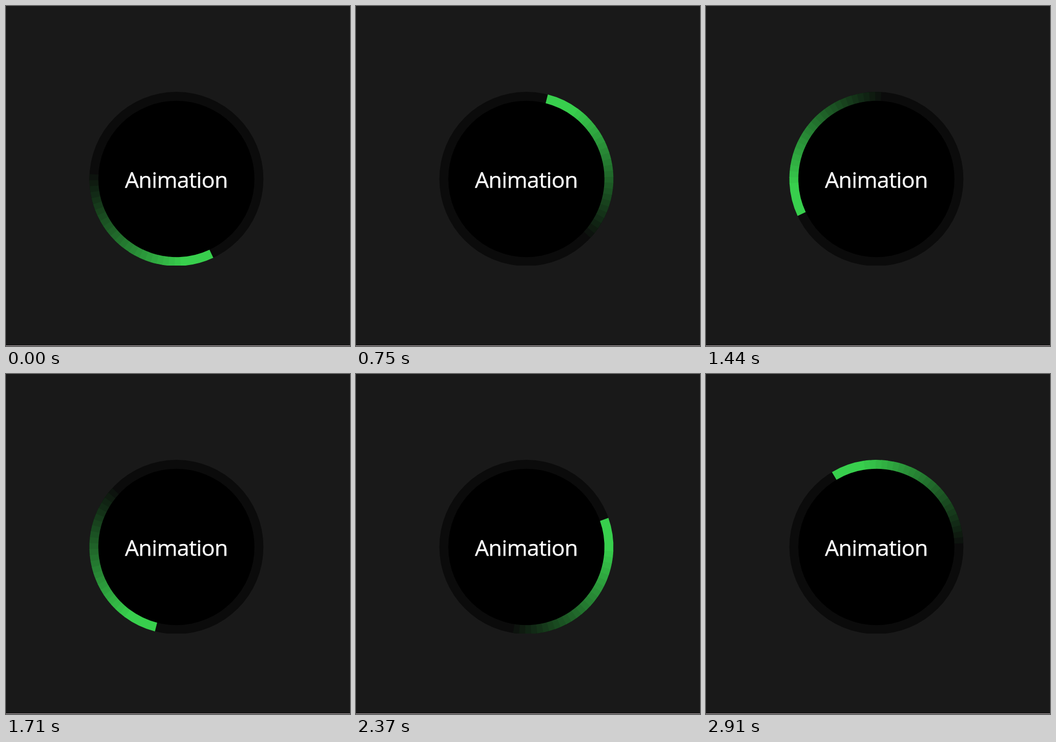
An HTML page with a canvas that plays this animation: 642x634 px, repeating every 3.01 s.

```html
<!DOCTYPE html>
<html lang="en">
<head>
<meta charset="utf-8">
<title>Ring animation</title>
<style>
  html, body { margin: 0; width: 100%; height: 100%; overflow: hidden; background: #191919; }
  canvas { display: block; }
</style>
</head>
<body>
<canvas id="stage" width="642" height="634"></canvas>
<script>
const ctx = document.getElementById('stage').getContext('2d');
const LOOP = 3010, TICK = 30;
const CX = 318, CY = 322.5, OUTER = 162.4, INNER = 145.7;
const GREEN = [56, 207, 77], TRACK = [11, 11, 11];
const START = 64.9, SPEED = 0.1875;            // degrees, degrees per ms
const SOLID = 22, SEGMENT = 4, SEGMENTS = 24;  // bright head, then fading pieces

// The ring turns at constant speed but is redrawn in steps.
// Tempo: number of steps and their average length in ticks.
const TEMPO = [[2, 4.5], [6, 4], [3, 5], [6, 13 / 3], [3, 5], [2, 4]];
const stepTimes = [0];
let clock = 0;
for (const [count, length] of TEMPO) {
  for (let i = 0; i < count; i++) {
    clock += length;
    stepTimes.push(Math.round(clock - 0.1) * TICK);
  }
}

const rad = degrees => degrees * Math.PI / 180;
const mix = amount =>
  `rgb(${TRACK.map((c, i) => Math.round(c + (GREEN[i] - c) * amount)).join(',')})`;

function disc(radius, color) {
  ctx.fillStyle = color;
  ctx.beginPath();
  ctx.arc(CX, CY, radius, 0, 2 * Math.PI);
  ctx.fill();
}

function band(from, to, color) {
  ctx.fillStyle = color;
  ctx.beginPath();
  ctx.arc(CX, CY, OUTER, rad(from), rad(to));
  ctx.arc(CX, CY, INNER, rad(to), rad(from), true);
  ctx.fill();
}

function drawRing(head) {
  ctx.save();
  ctx.beginPath();
  ctx.rect(0, 0, 642, 484);
  ctx.clip();
  disc(OUTER, mix(0));
  disc(INNER, '#000');
  // Tail first; each piece overlaps the one behind so no seams show.
  for (let k = SEGMENTS - 1; k >= 0; k--) {
    const from = head + SOLID + k * SEGMENT;
    band(from, from + SEGMENT + 0.3, mix(1 - (k + 1) / (SEGMENTS + 1)));
  }
  band(head, head + SOLID + 0.3, mix(1));
  ctx.restore();
}

function drawLabel() {
  ctx.fillStyle = ctx.strokeStyle = '#fff';
  ctx.lineWidth = 0.4;
  ctx.font = '41px "Open Sans", "Noto Sans", sans-serif';
  ctx.letterSpacing = '-0.6px';
  ctx.fillText('Animation', 222, 338.5);
  ctx.strokeText('Animation', 222, 338.5);
}

function draw(time) {
  const shown = stepTimes.findLast(t => t <= time);
  ctx.fillStyle = '#191919';
  ctx.fillRect(0, 0, 642, 634);
  ctx.fillStyle = '#b4aaae';
  ctx.fillRect(0, 633, 642, 1);
  drawRing(START - shown * SPEED);
  drawLabel();
}

function tick() {
  draw(performance.now() % LOOP);
  requestAnimationFrame(tick);
}
tick();
</script>
</body>
</html>
```
